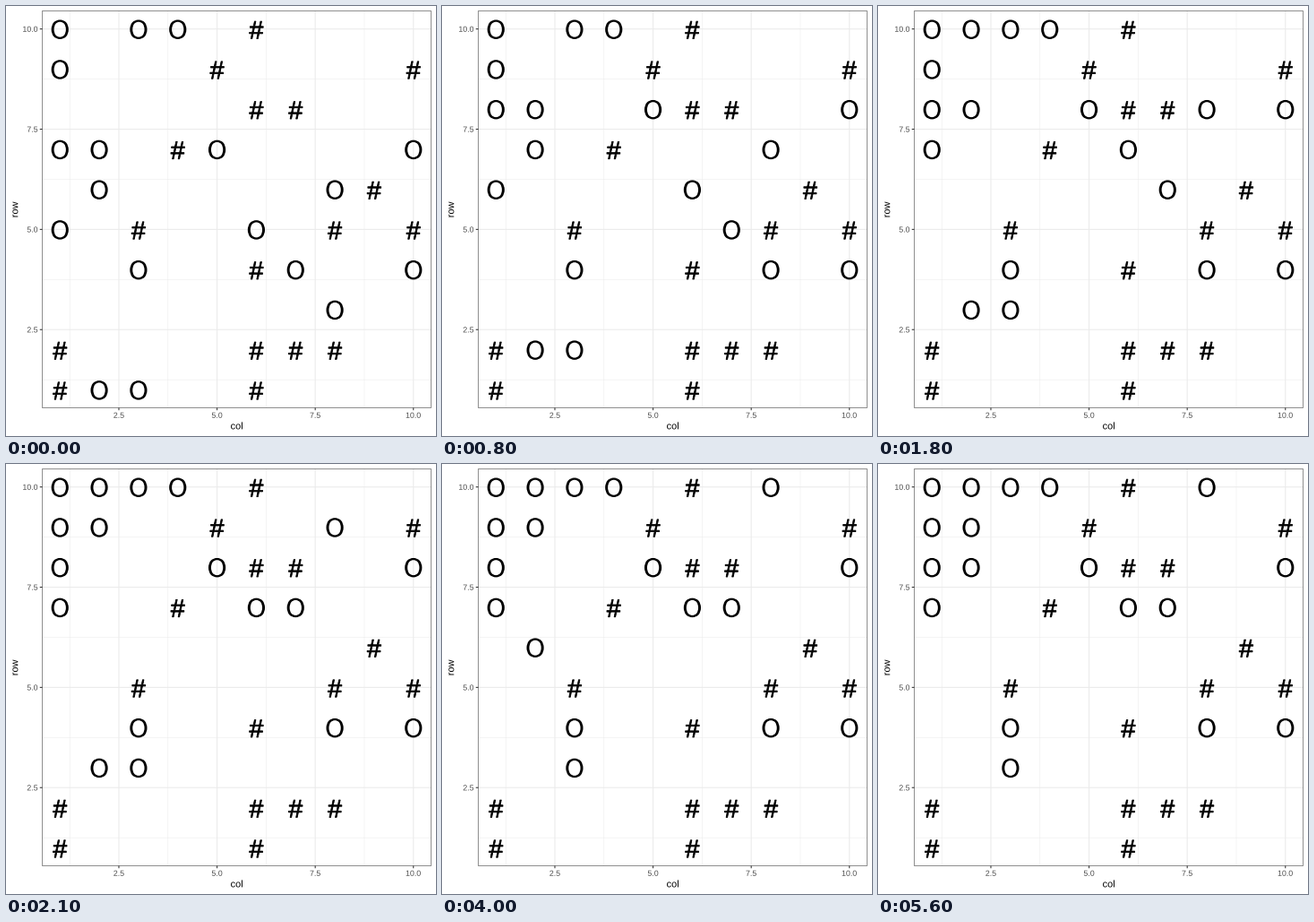
Write a matplotlib script that moves like this. It is 480 by 480 pixels and loops after 7200 ms.

```python
import matplotlib.pyplot as plt
from matplotlib.animation import FuncAnimation
from matplotlib.patches import PathPatch, Rectangle
from matplotlib.textpath import TextPath
from matplotlib.transforms import Affine2D

SIZE, DPI = 480, 80
PT = 72 / DPI  # points per pixel
LEFT, RIGHT, TOP, BOTTOM = 40.5, 474.5, 5.5, 448.5
GRID, DARK, LABEL = "#ebebeb", "#333333", "#4d4d4d"
STEP_MS, STEPS = 100, 72
SYMBOL_SIZE, SYMBOL_DROP = 28.45, 10.9

PLATFORM = """
O....#....
O.OO#....#
.....##...
OO.#O....O
.O.....O#.
O.#..O.#.#
..O..#O..O
.......O..
#....###..
#OO..#....
""".split()


def px(col):
    return LEFT + (col - 0.55) * (RIGHT - LEFT) / 9.9


def py(row):
    return BOTTOM - (row - 0.55) * (BOTTOM - TOP) / 9.9


def cells(mark):
    return [(c + 1, 10 - r) for r, line in enumerate(PLATFORM)
            for c, ch in enumerate(line) if ch == mark]


def tilt_states(rocks, cubes):
    """Rocks after each step; a step lifts one row by one, from row 9 down to 1."""
    states = []
    for step in range(STEPS):
        row = 9 - step % 9
        taken = set(rocks) | set(cubes)
        rocks = [(c, r + 1) if r == row and (c, r + 1) not in taken else (c, r)
                 for c, r in rocks]
        states.append(rocks)
    return states


fig = plt.figure(figsize=(SIZE / DPI, SIZE / DPI), dpi=DPI, facecolor="white")
ax = fig.add_axes([0, 0, 1, 1])
ax.set_xlim(0, SIZE)
ax.set_ylim(SIZE, 0)
ax.axis("off")


def line(xs, ys, color, width, z):
    ax.plot(xs, ys, color=color, lw=width * PT, solid_capstyle="butt",
            snap=False, zorder=z)


def place(x, y):
    return Affine2D().translate(x, y) + ax.transData


def write(x, y, text, size, color, family="Liberation Sans", align=0.5,
          turn=0, stroke=0):
    """Text outlined at sub-pixel precision, baseline at y."""
    path = TextPath((0, 0), text, size=size, prop={"family": family})
    box = path.get_extents()
    anchor = box.x0 + align * box.width
    path = path.transformed(
        Affine2D().translate(-anchor, 0).scale(1, -1).rotate_deg(turn))
    patch = PathPatch(path, fc=color, ec=color, lw=stroke * PT, snap=False,
                      transform=place(x, y), zorder=4)
    return ax.add_patch(patch)


def symbol(col, row, mark, **style):
    return write(px(col), py(row) + SYMBOL_DROP, mark, SYMBOL_SIZE, "black", **style)


for v in (1.25, 3.75, 6.25, 8.75):
    line([px(v)] * 2, [TOP, BOTTOM], GRID, 0.53, 1)
    line([LEFT, RIGHT], [py(v)] * 2, GRID, 0.53, 1)

for v in (2.5, 5, 7.5, 10):
    line([px(v)] * 2, [TOP, BOTTOM], GRID, 1.07, 2)
    line([LEFT, RIGHT], [py(v)] * 2, GRID, 1.07, 2)
    line([px(v)] * 2, [BOTTOM, BOTTOM + 2.75], DARK, 1.07, 3)
    line([LEFT - 2.75, LEFT], [py(v)] * 2, DARK, 1.07, 3)
    write(px(v), 459.8, f"{v:.1f}", 8.8, LABEL)
    write(35.2, py(v) + 3.15, f"{v:.1f}", 8.8, LABEL, align=1)

# Only the inner half of the border is visible.
ax.add_patch(Rectangle((LEFT, TOP), RIGHT - LEFT, BOTTOM - TOP, fill=False,
                       ec=DARK, lw=0.55 * PT, snap=False, zorder=5))
write((LEFT + RIGHT) / 2, 472.4, "col", 11, "black")
write(13.3, (TOP + BOTTOM) / 2, "row", 11, "black", turn=-90)

cubes = cells("#")
for c, r in cubes:
    symbol(c, r, "#", stroke=0.8)
states = tilt_states(cells("O"), cubes)
rocks = [symbol(c, r, "O", family="DejaVu Sans") for c, r in states[0]]


def update(i):
    for rock, (col, row) in zip(rocks, states[i]):
        rock.set_transform(place(px(col), py(row) + SYMBOL_DROP))
    return rocks


anim = FuncAnimation(fig, update, frames=STEPS, interval=STEP_MS,
                     repeat=True, repeat_delay=0, blit=False)
plt.show()
```
